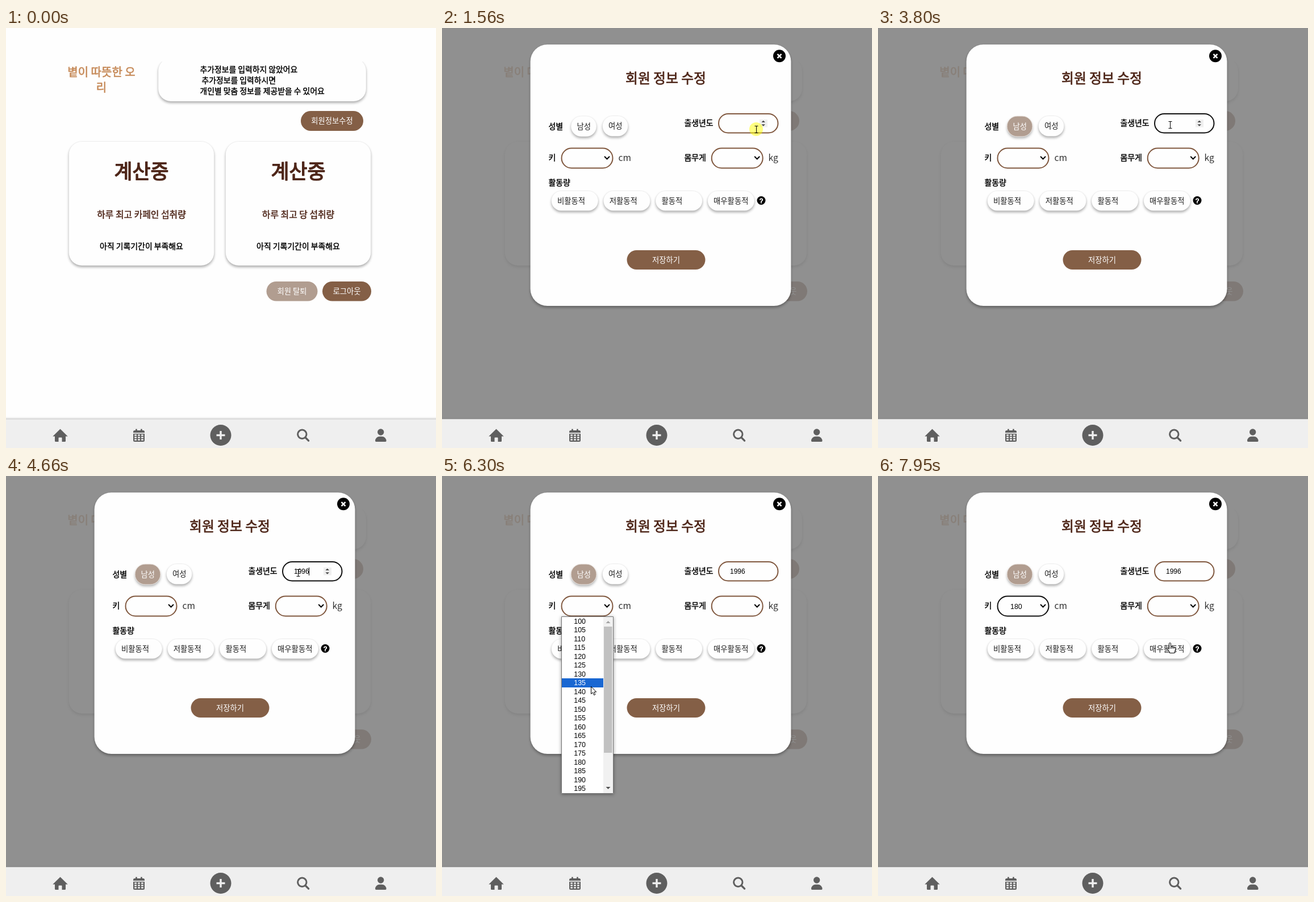
These frames come from a looping animation (757x739 px, 8 s). An HTML page with a canvas:

```html
<!DOCTYPE html>
<html lang="ko">
<head>
<meta charset="utf-8">
<title>회원 정보 수정</title>
<style>
html, body { margin: 0; width: 100%; height: 100%; overflow: hidden; background: #fefefe; }
canvas { display: block; width: 757px; height: 739px; }
</style>
</head>
<body>
<canvas id="stage" width="757" height="739"></canvas>
<script>
const ctx = document.getElementById('stage').getContext('2d');
const LOOP = 8000, MODAL_OPEN = 1560, LIST_OPEN = 5885, LIST_CLOSE = 7560;
const WHITE = '#fefefe', BROWN = '#845f46', TAN = '#b19d90', DARK = '#4e2619', ICON = '#5f5f5f', NAV = '#efefef';
const KR = '"Noto Sans CJK KR", "Noto Sans CJK", sans-serif';
const ARIAL = '"Liberation Sans", sans-serif';

const rect = (x, y, w, h) => ({ x, y, w, h });
const inside = (r, x, y) => x >= r.x && x < r.x + r.w && y >= r.y && y < r.y + r.h;
const during = (t, a, b) => t >= a && t < b;

const EDIT = rect(519, 146, 110, 35);
const YEAR = rect(487, 151, 104.5, 33.5);
const MALE = rect(227, 155, 45, 36);
const FEMALE = rect(282.5, 154.5, 45, 36);
const LEVELS = ['비활동적', '저활동적', '활동적', '매우활동적']
  .map((label, i) => ({ label, ...rect(192.5 + i * 91.7, 286.5, 82.5, 35) }));

const ENTRY = [745, 722];
const MOVES = [
  { start: 70, end: 820, to: [553, 178], via: [320, 250] },
  { start: 1880, end: 2430, to: [247, 177] },
  { start: 2640, end: 3230, to: [514, 170], via: [380, 161] },
  { start: 4970, end: 5750, to: [270, 235] },
  { start: 6040, end: 6800, to: [260, 524], via: [258, 380] },
  { start: 7060, end: 7130, to: [260, 514] },
  { start: 7330, end: 7400, to: [260, 507] },
  { start: 7560, end: 7940, to: [514, 293] }
];
const CLICKS = [1490, 2500, 3260, 5820, 7480];

// Korean text; "heavy" thickens the strokes, in em
function text(str, x, y, size, { heavy = 0, color = '#000', align = 'left', font = KR } = {}) {
  ctx.font = `${size}px ${font}`;
  ctx.textAlign = align;
  ctx.fillStyle = ctx.strokeStyle = color;
  ctx.lineWidth = size * heavy;
  ctx.lineJoin = 'round';
  const base = y + size * 0.37;
  ctx.fillText(str, x, base);
  if (heavy) ctx.strokeText(str, x, base);
}

const MEDIUM = { heavy: 0.032 };

function box(x, y, w, h, r, fill) {
  ctx.beginPath();
  ctx.roundRect(x, y, w, h, r);
  ctx.fillStyle = fill;
  ctx.fill();
}

function raised({ x, y, w, h }, r, fill = WHITE) {
  ctx.save();
  ctx.shadowColor = 'rgba(0,0,0,.3)';
  ctx.shadowBlur = 4;
  ctx.shadowOffsetY = 3;
  box(x, y, w, h, r, fill);
  ctx.restore();
  ctx.lineWidth = 1;
  ctx.strokeStyle = fill === WHITE ? 'rgba(0,0,0,.05)' : '#eee8e4';
  ctx.stroke();
}

function button(label, { x, y, w, h }, fill = BROWN) {
  box(x, y, w, h, h / 2, fill);
  text(label, x + w / 2, y + h / 2, 13.33, { color: '#fff', align: 'center' });
}

function disc(x, y, r, fill) {
  ctx.beginPath();
  ctx.arc(x, y, r, 0, Math.PI * 2);
  ctx.fillStyle = fill;
  ctx.fill();
}

function line(x0, y0, x1, y1, width, color) {
  ctx.beginPath();
  ctx.moveTo(x0, y0);
  ctx.lineTo(x1, y1);
  ctx.lineWidth = width;
  ctx.strokeStyle = color;
  ctx.stroke();
}

// Triangle with its base at y; negative h points up
function triangle(x, y, half, h, fill) {
  ctx.beginPath();
  ctx.moveTo(x - half, y);
  ctx.lineTo(x + half, y);
  ctx.lineTo(x, y + h);
  ctx.fillStyle = fill;
  ctx.fill();
}

function card(x, title) {
  raised(rect(x, 199.5, 256, 218.5), 23);
  const mid = x + 128;
  text('계산중', mid, 252, 34.8, { heavy: 0.042, color: DARK, align: 'center' });
  text(title, mid, 328, 15.85, { ...MEDIUM, color: DARK, align: 'center' });
  text('아직 기록기간이 부족해요', mid, 383.5, 13.9, { ...MEDIUM, align: 'center' });
}

function drawPage() {
  ctx.fillStyle = WHITE;
  ctx.fillRect(0, 0, 757, 739);
  const name = { ...MEDIUM, color: '#c68a59', align: 'center' };
  text('볕이 따뜻한 오', 168, 78, 20, name);
  text('리', 168, 105, 20, name);

  ctx.save();
  ctx.beginPath();
  ctx.rect(0, 59, 757, 100);
  ctx.clip();
  raised(rect(268, 53, 366, 76), 22);
  ctx.restore();
  text('추가정보를 입력하지 않았어요', 341.5, 73, 13.85, MEDIUM);
  text('추가정보를 입력하시면', 344.5, 91.5, 13.85, MEDIUM);
  text('개인별 맞춤 정보를 제공받을 수 있어요', 341.5, 110.5, 13.85, MEDIUM);

  button('회원정보수정', EDIT);
  card(110.5, '하루 최고 카페인 섭취량');
  card(386.5, '하루 최고 당 섭취량');
  button('회원 탈퇴', rect(458.5, 446, 90, 34.5), TAN);
  button('로그아웃', rect(557, 446, 86, 34.5));
}

function field({ x, y, w, h }, focused) {
  box(x, y, w, h, h / 2, WHITE);
  ctx.lineWidth = 2;
  ctx.strokeStyle = focused ? '#101010' : '#80583f';
  ctx.stroke();
}

function select(x, value, focused) {
  field(rect(x, 211.5, 90, 35), focused);
  line(x + 75.5, 226, x + 80.5, 231, 2, '#000');
  line(x + 84.5, 226, x + 79.5, 231, 2, '#000');
  text(value, x + 22.5, 229, 12.4, { font: ARIAL });
}

function chip(label, r, selected) {
  raised(r, r.h / 2, selected ? TAN : WHITE);
  text(label, r.x + 10.5, r.y + r.h / 2, 13.33, { color: selected ? '#fff' : '#1c1c1c' });
}

function drawYear(t, hovered) {
  const focused = during(t, 3330, 5820);
  field(YEAR, focused);
  if (focused || hovered) {
    ctx.fillStyle = NAV;
    ctx.fillRect(559, 161, 14, 13.5);
    triangle(565.7, 166, 3.3, -3.2, '#444');
    triangle(565.7, 169.5, 3.3, 3.2, '#444');
  }
  const firstKey = 4260, keyGap = 200;
  const digits = t < firstKey ? 0 : Math.min(4, 2 + Math.floor((t - firstKey) / keyGap));
  text('1996'.slice(0, digits), 507, 168, 12, { font: ARIAL });
  const lastInput = digits ? firstKey + (digits - 2) * keyGap : 3300;
  if (focused && (t - lastInput) % 1000 < 500) {
    ctx.fillStyle = '#000';
    ctx.fillRect(Math.round(506.5 + digits * 6.67), 161, 1, 14);
  }
}

function drawModal(t, x, y) {
  ctx.fillStyle = 'rgba(126,126,126,.86)';
  ctx.fillRect(0, 0, 757, 688);
  raised(rect(155.5, 29, 459, 460), 30);
  disc(594, 49.3, 11, '#000');
  for (const s of [-3.5, 3.5]) line(594 - s, 45.8, 594 + s, 52.8, 2.4, '#fff');
  text('회원 정보 수정', 394, 88.5, 23.8, { ...MEDIUM, color: DARK, align: 'center' });

  text('성별', 187.5, 172.5, 13.9, MEDIUM);
  text('출생년도', 426.5, 167, 13.9, MEDIUM);
  text('키', 187.5, 228, 13.9, MEDIUM);
  text('몸무게', 426.5, 228, 13.9, MEDIUM);
  text('활동량', 187.5, 271.5, 13.9, MEDIUM);
  text('cm', 310.5, 228, 15.6, { color: '#333' });
  text('kg', 574.5, 228, 15.6, { color: '#333' });

  chip('남성', MALE, t >= 2570);
  chip('여성', FEMALE);
  LEVELS.forEach(level => chip(level.label, level));
  disc(562, 303.5, 7.5, '#000');
  text('?', 562, 303.5, 11, { heavy: 0.08, color: '#fff', align: 'center', font: ARIAL });

  drawYear(t, inside(YEAR, x, y));
  const chosen = t >= LIST_CLOSE;
  select(210.5, chosen ? '180' : '', chosen);
  select(474.7, '', false);
  button('저장하기', rect(325.5, 391, 138, 34));
}

function drawList(pointerY) {
  const top = 247.5, pitch = 15.53;
  ctx.save();
  ctx.shadowColor = 'rgba(0,0,0,.4)';
  ctx.shadowBlur = 6;
  ctx.shadowOffsetY = 1;
  ctx.fillStyle = '#fff';
  ctx.fillRect(210, 247, 92, 312);
  ctx.restore();
  const hover = Math.floor((pointerY - top) / pitch);
  for (let i = 0; i < 20; i++) {
    if (i === hover) {
      ctx.fillStyle = '#1967d2';
      ctx.fillRect(210, Math.round(top + i * pitch), 74, 16);
    }
    text(String(100 + i * 5), 232.3, 255.3 + i * 15.5, 12.4, { font: ARIAL, color: i === hover ? '#fff' : '#000' });
  }
  ctx.fillStyle = '#f1f1f1';
  ctx.fillRect(284, 248, 17, 310);
  ctx.fillStyle = '#c1c1c1';
  ctx.fillRect(285, 265, 14.5, 222);
  triangle(292.5, 259, 4, -4, '#a3a3a3');
  triangle(292.5, 547, 4, 4, '#505050');
  ctx.lineWidth = 1;
  ctx.strokeStyle = '#767676';
  ctx.strokeRect(210.5, 247.5, 91, 311);
}

function drawNav() {
  ctx.save();
  ctx.shadowColor = 'rgba(0,0,0,.35)';
  ctx.shadowBlur = 4;
  ctx.shadowOffsetY = -1;
  ctx.fillStyle = NAV;
  ctx.fillRect(-9, 688.5, 775, 60);
  ctx.restore();

  // Home
  triangle(95.5, 718.5, 13.2, -13, ICON);
  box(86, 716, 19, 12, 1.5, ICON);
  box(92.5, 720.5, 6, 8, [1, 1, 0, 0], NAV);

  // Calendar
  box(224, 708, 20, 20, 2.5, ICON);
  for (const x of [228, 237]) box(x, 705.5, 2.8, 4, 1, ICON);
  box(224, 712, 20, 1.8, 0, NAV);
  for (let i = 0; i < 9; i++) box(226.2 + (i % 3) * 5.9, 715.2 + Math.floor(i / 3) * 4, 3.8, 2.5, 0, NAV);

  // Add
  disc(378, 716.5, 18.5, ICON);
  line(370.5, 716.5, 385.5, 716.5, 3.4, NAV);
  line(378, 709, 378, 724, 3.4, NAV);

  // Search
  ctx.beginPath();
  ctx.arc(521.3, 714.8, 7.7, 0, Math.PI * 2);
  ctx.lineWidth = 3;
  ctx.strokeStyle = ICON;
  ctx.stroke();
  ctx.lineCap = 'round';
  line(527, 720.5, 532.6, 726.1, 3.4, ICON);
  ctx.lineCap = 'butt';

  // Profile
  disc(659.7, 711, 5.7, ICON);
  box(650, 718.8, 19.5, 9.2, [8, 8, 1.5, 1.5], ICON);
}

// Eased quadratic curve through each move's control point
function pointerAt(t) {
  let from = ENTRY;
  for (const { start, end, to, via } of MOVES) {
    if (t < start) break;
    const p = Math.min(1, (t - start) / (end - start));
    const u = 1 - (1 - p) ** 1.5;
    from = from.map((a, i) => {
      const control = via ? via[i] : (a + to[i]) / 2;
      return a * (1 - u) ** 2 + 2 * control * u * (1 - u) + to[i] * u * u;
    });
  }
  return from;
}

function cursorAt(t, x, y) {
  if (t < MODAL_OPEN) return inside(EDIT, x, y) ? 'hand' : 'arrow';
  if (during(t, LIST_OPEN, LIST_CLOSE)) return 'arrow';
  if (inside(YEAR, x, y)) return 'beam';
  return [MALE, FEMALE, ...LEVELS].some(r => inside(r, x, y)) ? 'hand' : 'arrow';
}

const CURSORS = {
  arrow: new Path2D('M.5 .5V13.5L3.5 10.8L5.6 15.5L7.8 14.6L5.8 10H9.7Z'),
  hand: new Path2D('M-1.5 1.5Q0 -.7 1.5 1.5V7L4 7.5L7 8L9.5 9.5V13L8 16.5V18.5H-.5V17L-5 10.5Q-4 8.5 -1.5 11.3Z'),
  beam: new Path2D('M-2.5 -5.5H3.5M.5 -5.5V6.5M-2.5 6.5H3.5')
};

function drawPointer(t, x, y) {
  if (CLICKS.some(at => during(t, at, at + 72))) disc(x, y, 12, 'rgba(255,255,0,.5)');
  const shape = cursorAt(t, x, y);
  ctx.save();
  ctx.translate(Math.round(x), Math.round(y));
  ctx.fillStyle = '#fff';
  ctx.fill(CURSORS[shape]);
  ctx.lineWidth = 1;
  ctx.strokeStyle = '#000';
  ctx.stroke(CURSORS[shape]);
  if (shape === 'hand') for (const fx of [1.5, 4, 6.7]) line(fx, 7.5, fx, 11, 1, '#000');
  ctx.restore();
}

function frame(now) {
  const t = now % LOOP;
  const [x, y] = pointerAt(t);
  drawPage();
  drawNav();
  if (t >= MODAL_OPEN) drawModal(t, x, y);
  if (during(t, LIST_OPEN, LIST_CLOSE)) drawList(y);
  if (t >= MOVES[0].start) drawPointer(t, x, y);
  requestAnimationFrame(frame);
}
requestAnimationFrame(frame);
</script>
</body>
</html>
```
